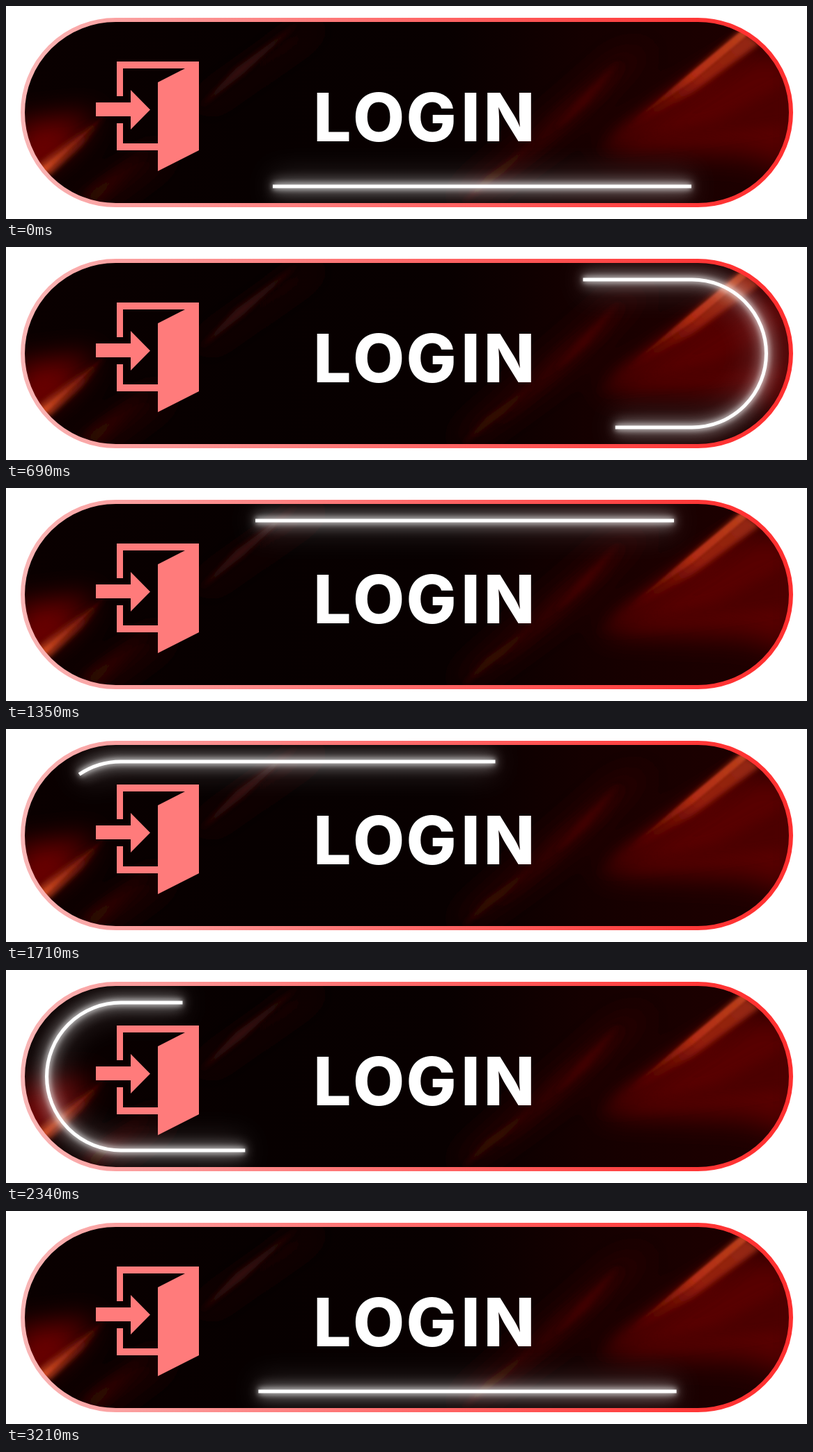
Write an HTML page that moves like this. It is 1150 by 307 pixels and loops after 3240 ms.

```html
<!DOCTYPE html>
<html lang="en">
<head>
<meta charset="utf-8">
<title>Login button</title>
<style>
  html, body { margin: 0; width: 100%; height: 100%; overflow: hidden; background: #fff; }
  svg { display: block; width: 100%; height: 100%; }
  .runner use { fill: none; stroke: #fff; }
  text { font: 800 96px Inter, "Open Sans", sans-serif; fill: #fff; text-anchor: middle; }
</style>
</head>
<body>
<svg viewBox="0 0 1150 307">
  <defs>
    <linearGradient id="rim" gradientUnits="userSpaceOnUse" x1="21" y1="0" x2="1130" y2="0">
      <stop offset="0" stop-color="#f8b6b6"/>
      <stop offset=".12" stop-color="#fba2a2"/>
      <stop offset=".5" stop-color="#ff6a6a"/>
      <stop offset=".9" stop-color="#ff3434"/>
      <stop offset="1" stop-color="#ff3030"/>
    </linearGradient>
    <linearGradient id="base" x1="0" x2="1">
      <stop offset="0" stop-color="#0a0000"/>
      <stop offset=".3" stop-color="#070000"/>
      <stop offset=".55" stop-color="#080000"/>
      <stop offset=".72" stop-color="#140000"/>
      <stop offset="1" stop-color="#200000"/>
    </linearGradient>
    <linearGradient id="rightBeam" gradientUnits="userSpaceOnUse" x1="1070" y1="30" x2="885" y2="180">
      <stop offset="0" stop-color="#b8401c"/>
      <stop offset=".45" stop-color="#b02c12"/>
      <stop offset="1" stop-color="#500400" stop-opacity="0"/>
    </linearGradient>
    <linearGradient id="leftBeam" gradientUnits="userSpaceOnUse" x1="48" y1="240" x2="155" y2="145">
      <stop offset="0" stop-color="#d04a20"/>
      <stop offset=".5" stop-color="#7c1c0c"/>
      <stop offset="1" stop-color="#300000" stop-opacity="0"/>
    </linearGradient>
    <filter id="soft2" filterUnits="userSpaceOnUse" x="0" y="0" width="1150" height="307"><feGaussianBlur stdDeviation="1.5"/></filter>
    <filter id="soft4" filterUnits="userSpaceOnUse" x="0" y="0" width="1150" height="307"><feGaussianBlur stdDeviation="3.5"/></filter>
    <filter id="soft9" filterUnits="userSpaceOnUse" x="0" y="0" width="1150" height="307"><feGaussianBlur stdDeviation="9"/></filter>
    <filter id="soft20" filterUnits="userSpaceOnUse" x="-60" y="-60" width="1270" height="427"><feGaussianBlur stdDeviation="20"/></filter>
    <clipPath id="pill"><rect x="24" y="20" width="1103" height="267" rx="133.5"/></clipPath>
    <path id="track" d="M383 260H985A106.5 106.5 0 0 0 985 47H165A106.5 106.5 0 0 0 165 260Z"/>
  </defs>

  <g clip-path="url(#pill)">
    <rect x="21" y="17" width="1109" height="273" fill="url(#base)"/>

    <!-- wide red haze -->
    <g filter="url(#soft20)">
      <path d="M1075 60L1140 70V240L1060 215L850 208L960 130Z" fill="#580000"/>
      <path d="M880 70L930 60L800 185L670 280H640Z" fill="#300000"/>
      <path d="M10 170L130 155L90 205L30 250Z" fill="#700400"/>
      <path d="M215 205L240 215L140 290H90Z" fill="#2c0200"/>
      <path d="M430 25L460 30L290 150L270 140Z" fill="#200000"/>
    </g>

    <!-- broad streaks -->
    <g filter="url(#soft9)">
      <path d="M1062 38L1085 50L1010 120L860 200L920 150Z" fill="#5c0600"/>
      <path d="M1124 110L1020 165L845 208L1000 190L1124 170Z" fill="#4c0000"/>
      <path d="M885 80L855 125L790 180L700 260L800 150Z" fill="#380200"/>
      <path d="M28 245L135 160L100 190L28 200Z" fill="#680600"/>
      <path d="M160 250L130 280H105L205 205Z" fill="#3c0800"/>
    </g>

    <!-- narrow rays -->
    <g filter="url(#soft4)">
      <path d="M1055 34L1082 54L985 125L880 185Z" fill="url(#rightBeam)" opacity=".65"/>
      <path d="M42 232L62 244L110 200L155 145Z" fill="url(#leftBeam)" opacity=".75"/>
      <path d="M420 24L340 98L278 146L330 90Z" fill="#34100a"/>
      <path d="M760 195L715 240L655 285L690 245Z" fill="#360806"/>
      <path d="M880 80L835 140L790 178L825 132Z" fill="#400600"/>
    </g>
    <g filter="url(#soft2)">
      <path d="M1056 36L1064 42L985 108L895 170Z" fill="url(#rightBeam)"/>
      <path d="M46 238L56 240L100 198L145 155Z" fill="url(#leftBeam)"/>
    </g>

    <g class="runner">
      <use href="#track" stroke-width="38" opacity=".13" filter="url(#soft20)"/>
      <use href="#track" stroke-width="18" opacity=".36" filter="url(#soft9)"/>
      <use href="#track" stroke-width="10" opacity=".55" filter="url(#soft4)"/>
    </g>
  </g>

  <rect x="24" y="20" width="1103" height="267" rx="133.5" fill="none" stroke="url(#rim)" stroke-width="6"/>
  <g class="runner"><use href="#track" stroke-width="5"/></g>

  <g fill="#ff7b7b">
    <path d="M159 80H277V208L218 238V208H159V169H168V198H218V110L257 90H168V130H159Z"/>
    <path d="M129 139H179V121L207 149.5L179 178V159H129Z"/>
  </g>
  <text x="468.5 535 610.5 667 722.5" y="195">LOGIN</text>
</svg>
<script>
  const LOOP = 3240, STEP = 30, DASH = 601;
  const track = document.getElementById("track");
  const length = track.getTotalLength();
  const runners = document.querySelectorAll(".runner");
  for (const runner of runners) runner.style.strokeDasharray = `${DASH} ${length - DASH}`;

  const start = performance.now();
  function draw() {
    const elapsed = (performance.now() - start) % LOOP;
    const time = Math.floor(elapsed / STEP) * STEP;
    for (const runner of runners) runner.style.strokeDashoffset = -length * time / LOOP;
    requestAnimationFrame(draw);
  }
  draw();
</script>
</body>
</html>
```
